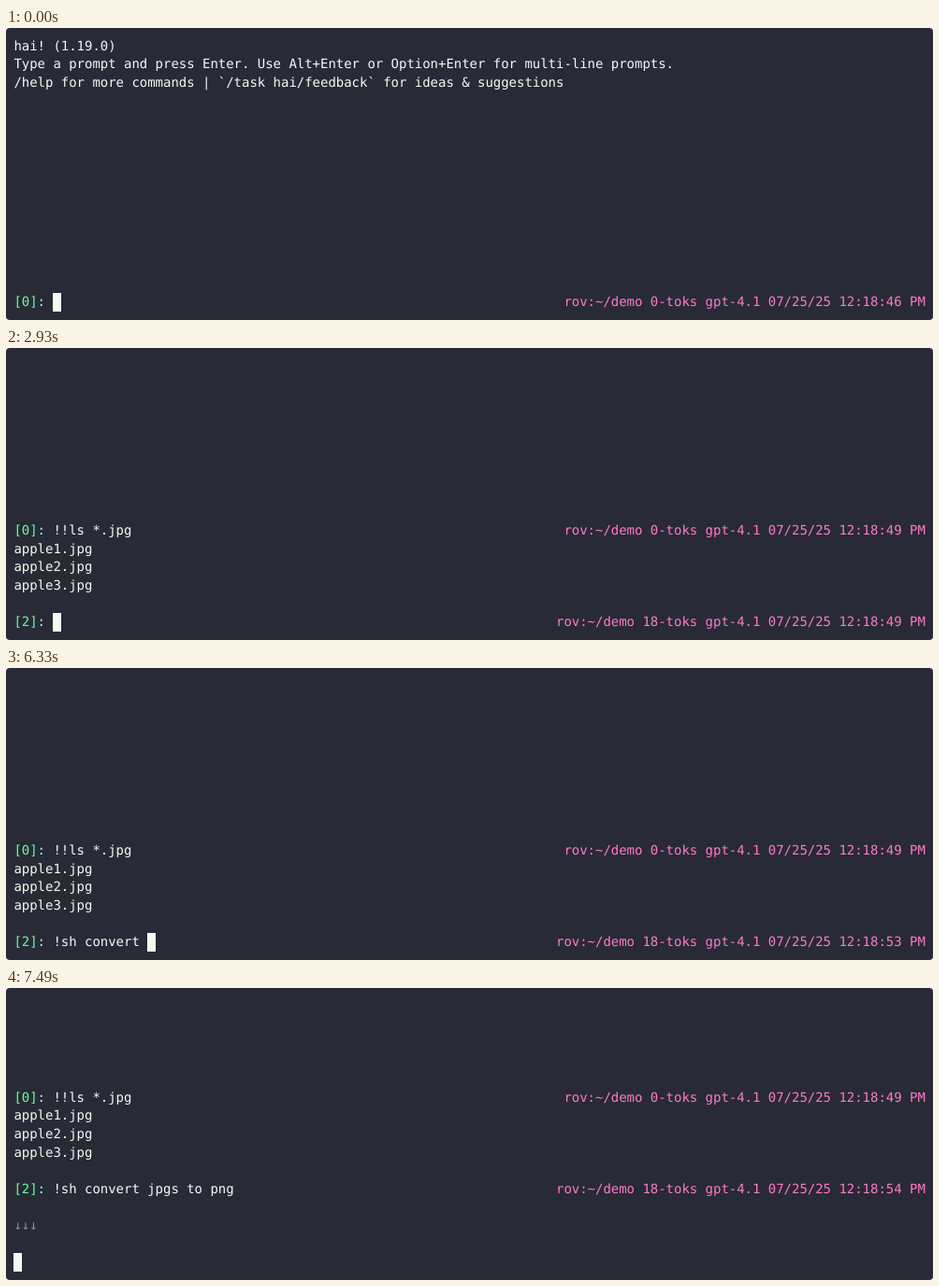
An HTML page for the animation above (8000 ms loop, 991 by 313 pixels).

```html
<!DOCTYPE html>
<html lang="en">
<head>
<meta charset="utf-8">
<title>Terminal session</title>
<style>
  html, body { margin: 0; width: 100%; height: 100%; overflow: hidden; background: #fff; }
  svg { display: block; width: 991px; height: 313px; }
  text {
    font: 14px "DejaVu Sans Mono", "Liberation Mono", monospace;
    font-variant-ligatures: none;
    white-space: pre;
    text-rendering: geometricPrecision;
    fill: #f8f8f2;
  }
  .back { fill: #282a36; }
  .cursor { fill: #f8f8f2; shape-rendering: crispEdges; }
  .index { fill: #69ff94; }
  .colon { fill: #a4ffff; }
  .status { fill: #ff79c6; }
  .dim { fill-opacity: .5; }
</style>
</head>
<body>
<svg viewBox="0 0 991 313">
  <rect class="back" width="991" height="313" rx="4"/>
  <g id="terminal"></g>
</svg>
<script>
const LOOP = 8000, COLS = 116, CELL = 8.4, LINE = 19.6, LAST_ROW = 14;
const RUN_LIST = 2930, RUN_CONVERT = 7490;

// Each entry: time in ms, characters added at that time
const listKeys = [
  [640, '!'], [790, '!'], [1290, 'l'], [1540, 's'], [2100, ' '],
  [2280, '*'], [2480, '.'], [2630, 'j'], [2710, 'pg']
];
const convertKeys = [
  [4350, '!'], [4680, 's'], [4820, 'h'], [4900, ' '], [5080, 'c'], [5170, 'on'],
  [5310, 'v'], [5400, 'e'], [5520, 'rt'], [6330, ' '],
  [6530, 'j'], [6600, 'p'], [6680, 'g'], [6750, 's'], [6820, ' t'],
  [6910, 'o'], [6970, ' '], [7220, 'p'], [7310, 'n'], [7400, 'g']
];
// The clock only moves on when the prompt is repainted
const ticks = [[0, 46], [640, 47], [1290, 48], [2280, 49], [4350, 51], [5310, 52], [6330, 53], [7220, 54]];

const intro = [
  'hai! (1.19.0)',
  'Type a prompt and press Enter. Use Alt+Enter or Option+Enter for multi-line prompts.',
  '/help for more commands | `/task hai/feedback` for ideas & suggestions'
];
const files = [1, 2, 3].map(n => `apple${n}.jpg`);

const terminal = document.getElementById('terminal');
const until = (list, t) => list.filter(([at]) => at <= t);
const typed = (keys, t) => until(keys, t).map(([, chars]) => chars).join('');
const seconds = t => until(ticks, t).pop()[1];
const colX = col => CELL * (col + 1);
const rowY = row => LINE * (row + .5);

function addNode(name, attrs, content = '') {
  const el = document.createElementNS('http://www.w3.org/2000/svg', name);
  for (const key in attrs) el.setAttribute(key, attrs[key]);
  el.textContent = content;
  terminal.append(el);
}

function addText(row, col, content, style = 'plain') {
  if (!content) return;
  const x = [...content].map((_, i) => colX(col + i).toFixed(2)).join(' ');
  addNode('text', { x, y: (rowY(row) + 14).toFixed(2), class: style }, content);
}

function addCursor(row, col) {
  const x = Math.round(colX(col)), y = Math.round(rowY(row));
  addNode('rect', {
    class: 'cursor', x, y,
    width: Math.round(colX(col + 1)) - x,
    height: Math.round(rowY(row + 1)) - y
  });
}

function addPrompt(row, index, input, tokens, sec) {
  const info = `rov:~/demo ${tokens}-toks gpt-4.1 07/25/25 12:18:${sec} PM`;
  addText(row, 0, `[${index}]`, 'index');
  addText(row, 3, ':', 'colon');
  addText(row, 5, input);
  addText(row, COLS - info.length, info, 'status');
}

function draw(t) {
  terminal.replaceChildren();
  const first = typed(listKeys, t), second = typed(convertKeys, t);
  if (t < RUN_LIST) {
    intro.forEach((line, i) => addText(i, 0, line));
    addPrompt(LAST_ROW, 0, first, 0, seconds(t));
    addCursor(LAST_ROW, 5 + first.length);
    return;
  }
  const done = t >= RUN_CONVERT;
  const row = done ? 5 : 9;
  addPrompt(row, 0, first, 0, seconds(RUN_LIST));
  files.forEach((name, i) => addText(row + 1 + i, 0, name));
  addPrompt(row + 5, 2, second, 18, seconds(t));
  if (done) addText(row + 7, 0, '↓↓↓', 'dim');
  addCursor(LAST_ROW, done ? 0 : 5 + second.length);
}

const changes = [...listKeys, ...convertKeys, [RUN_LIST], [RUN_CONVERT]];
const startTime = performance.now();
let shown = -1;

function tick() {
  const t = (performance.now() - startTime) % LOOP;
  const step = until(changes, t).length;
  if (step !== shown) {
    shown = step;
    draw(t);
  }
  requestAnimationFrame(tick);
}
tick();
</script>
</body>
</html>
```
